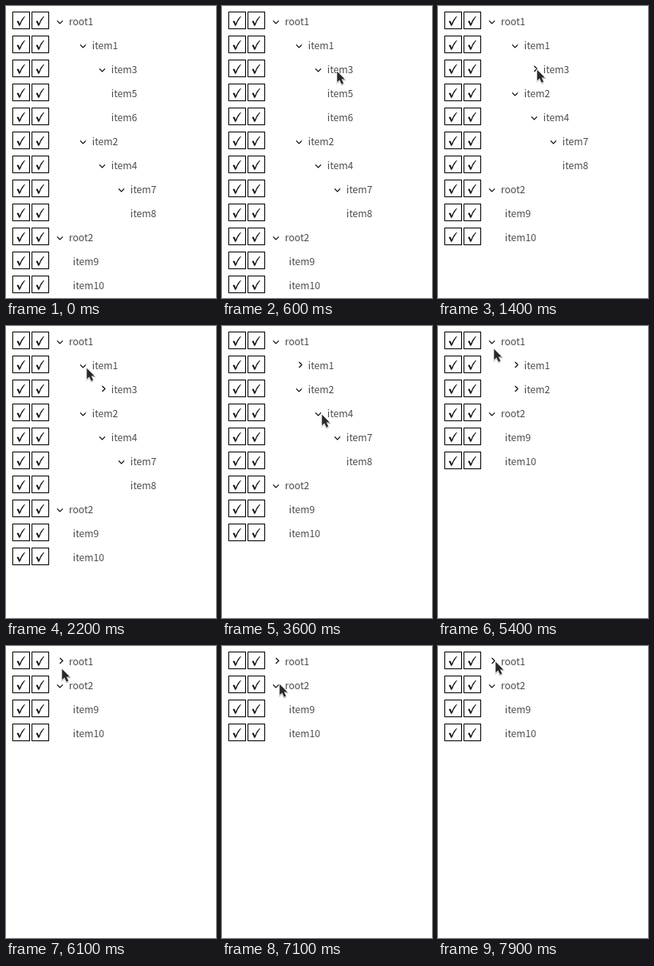
Animation of 263x365 px, one loop 8000 ms. Source, as an HTML page:

```html
<!DOCTYPE html>
<html lang="en">
<head>
<meta charset="utf-8">
<title>Collapsible tree</title>
<style>
  html, body { margin: 0; width: 100%; height: 100%; overflow: hidden; background: #fff; }
  svg { display: block; width: 263px; height: 365px; }
  text { font: 12.2px "Noto Sans CJK JP", "Noto Sans CJK SC", "Noto Sans CJK", "Noto Sans", sans-serif; fill: #4a4a4a; }
  .box { fill: #fff; stroke: #000; }
  .chevron { fill: none; stroke: #0a0a0a; stroke-width: 1.2; }
  #cursor { filter: drop-shadow(.5px 1px .7px rgba(0, 0, 0, .3)); }
</style>
</head>
<body>
<svg viewBox="0 0 263 365">
  <defs>
    <g id="check">
      <rect class="box" x=".5" y=".5" width="21" height="21"/>
      <path d="M5.6 12.2Q6.8 11.2 7.7 11.8L9 15.2Q11.2 9.6 14.9 6L15.9 6Q11.6 11.4 9.6 17.6L8.2 17.8Q7.2 14.5 5.6 12.2Z"/>
    </g>
  </defs>
  <g id="tree"></g>
  <g id="cursor">
    <path transform="translate(1.2 1.8) scale(.86)" d="M0 0V15.6L3.6 12.3L6.5 18.5L9.3 17.2L6.4 11.2H11.3Z"
      fill="#292929" stroke="#fff" stroke-width="1.6" paint-order="stroke"/>
  </g>
</svg>
<script>
const LOOP = 8000, STEP = 100, ROW = 30, INDENT = 24;

const outline = `
root1
 item1
  item3
   item5
   item6
 item2
  item4
   item7
    item8
root2
 item9
 item10`;

// Each stop of the pointer: travel time, position, then clicks on a node
const stops = [
  { from: 100, to: 700, x: 123, y: 78, node: 'item3', clicks: [1400] },
  { from: 1500, to: 2200, x: 100, y: 51, node: 'item1', clicks: [2500] },
  { from: 2700, to: 3400, x: 124, y: 109, node: 'item4', clicks: [3800] },
  { from: 4000, to: 4700, x: 95, y: 78, node: 'item2', clicks: [4900] },
  { from: 5000, to: 5400, x: 69, y: 27, node: 'root1', clicks: [5500] },
  { from: 6100, to: 6400, x: 71, y: 46, node: 'root2', clicks: [6600, 7000] },
  { from: 7100, to: 7600, x: 72, y: 38 },
  { from: 7700, to: 7900, x: 71, y: 18 }
];
const entry = { x: 240, y: 87 };

const tree = document.getElementById('tree');
const cursor = document.getElementById('cursor');

function add(parent, tag, attrs = {}) {
  const el = document.createElementNS('http://www.w3.org/2000/svg', tag);
  for (const key in attrs) el.setAttribute(key, attrs[key]);
  return parent.appendChild(el);
}

const nodes = outline.trim().split('\n').map(line => {
  const name = line.trim();
  return { name, depth: line.length - name.length };
});

nodes.forEach((node, i) => {
  node.branch = nodes[i + 1]?.depth > node.depth;
  node.x = node.depth ? 60 + INDENT * (node.depth + node.branch) : 79;
  if (!node.branch) node.x = 60 + INDENT * node.depth;
  node.row = add(tree, 'g');
  for (const x of [8, 32]) add(node.row, 'use', { href: '#check', x, y: 7 });
  if (node.branch) node.chevron = add(node.row, 'path', { class: 'chevron' });
  add(node.row, 'text', { x: node.x - .2, y: 24 }).textContent = node.name;
});

function isClosed(name, time) {
  const clicks = stops.find(stop => stop.node === name)?.clicks ?? [];
  return clicks.filter(at => at <= time).length % 2 === 1;
}

function drawTree(time) {
  let y = 0, hiddenBelow = Infinity;
  for (const node of nodes) {
    if (node.depth <= hiddenBelow) hiddenBelow = Infinity;
    const shown = hiddenBelow === Infinity;
    node.row.style.display = shown ? '' : 'none';
    if (!shown) continue;
    node.row.setAttribute('transform', `translate(0 ${y})`);
    y += ROW;
    if (!node.branch) continue;
    const closed = isClosed(node.name, time);
    if (closed) hiddenBelow = node.depth;
    node.chevron.setAttribute('d', closed
      ? `M${node.x - 11.5} 15l3.5 3.5l-3.5 3.5`
      : `M${node.x - 15} 18.3l3.5 3.5l3.5 -3.5`);
  }
}

function drawCursor(time) {
  cursor.style.display = time < stops[0].from ? 'none' : '';
  let { x, y } = entry;
  for (const stop of stops) {
    const u = Math.min(1, Math.max(0, (time - stop.from) / (stop.to - stop.from)));
    x += (stop.x - x) * u;
    y += (stop.y - y) * u;
  }
  cursor.setAttribute('transform', `translate(${Math.round(x)} ${Math.round(y)})`);
}

let start;
function tick(now) {
  start ??= now;
  const time = Math.floor(((now - start) % LOOP) / STEP) * STEP;
  drawTree(time);
  drawCursor(time);
  requestAnimationFrame(tick);
}
requestAnimationFrame(tick);
</script>
</body>
</html>
```
